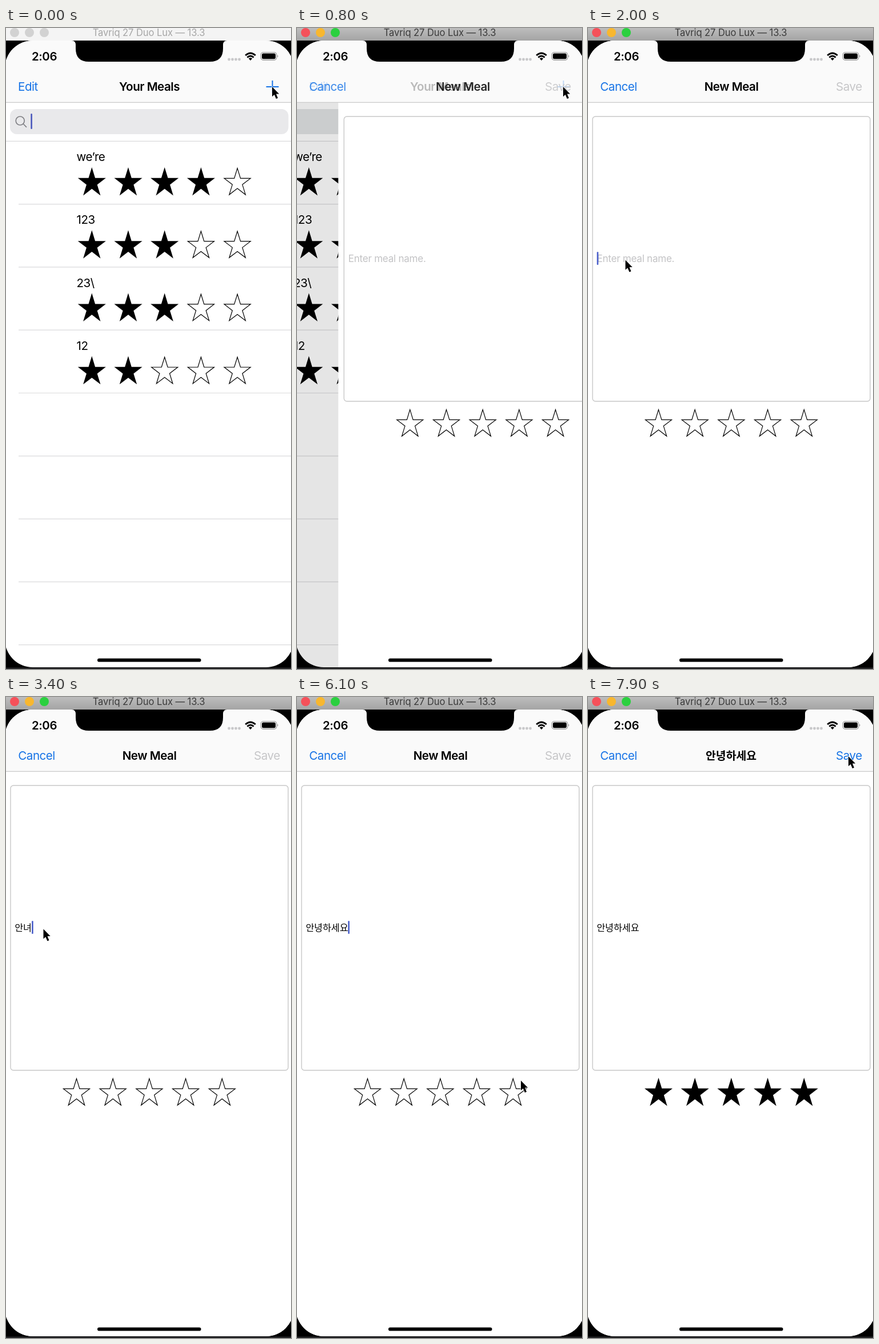
Animation, 499 px wide and 1123 px high, one loop 8000 ms. Source, as an HTML page:

```html
<!DOCTYPE html>
<html lang="ko">
<head>
<meta charset="utf-8">
<title>New Meal</title>
<style>
html, body { margin: 0; width: 100%; height: 100%; overflow: hidden; background: #000; }
svg { display: block; width: 100%; height: 100%; }
text { font-family: Inter, "Noto Sans CJK KR", "Noto Sans CJK JP", sans-serif; white-space: pre; }
.nav { font-size: 20.6px; letter-spacing: -.5px; }
.bold { font-weight: 600; text-anchor: middle; }
.blue { fill: #1673e6; }
.ko { font-family: "Noto Sans CJK KR", "Noto Sans CJK JP", "Noto Sans CJK", sans-serif; }
.small { font-size: 17.1px; letter-spacing: -.28px; }
.line { stroke: #dadadc; stroke-width: 1.2; }
</style>
</head>
<body>
<svg viewBox="0 0 499 1123" preserveAspectRatio="none">
  <defs>
    <clipPath id="screen"><rect x="-2" y="22" width="506" height="1098" rx="49"/></clipPath>
    <linearGradient id="metal" x2="0" y2="1">
      <stop stop-color="#bdbdbd"/><stop offset="1" stop-color="#a4a4a4"/>
    </linearGradient>
  </defs>
  <rect width="499" height="1123"/>
  <rect y="1120.5" width="499" height="2.5" fill="#242426"/>

  <rect id="bar" width="499" height="22"/>
  <g id="lights"><circle cx="15" cy="8" r="8"/><circle cx="41" cy="8" r="8"/><circle cx="67" cy="8" r="8"/></g>
  <text id="device" x="250" y="14" text-anchor="middle" font-size="16.6" letter-spacing="-.1">Tavriq 27 Duo Lux — 13.3</text>

  <g clip-path="url(#screen)">
    <rect y="22" width="499" height="1101" fill="#fff"/>
    <g id="list">
      <rect id="search" x="7" y="142" width="487.5" height="44" rx="12"/>
      <g fill="none" stroke="#808085" stroke-width="1.7" stroke-linecap="round">
        <circle cx="24.7" cy="162.5" r="7.5"/><path d="M30.2 168L35.5 173.3"/>
      </g>
      <rect x="43.3" y="150" width="2.6" height="27" rx="1" fill="#4a58bd"/>
      <path class="line" d="M-2 198.3H660"/>
      <g id="rows"></g>
    </g>
    <rect id="dim" x="-2" y="130" width="506" height="993"/>
    <g id="form">
      <rect x="-2" y="22" width="506" height="1101" fill="#fff"/>
      <rect x="8" y="155" width="486" height="499" rx="5" fill="#fff" stroke="#c8c8c8" stroke-width="1.4"/>
      <rect id="mark" x="12.5" y="392.5" width="93.5" height="24" fill="#cbd9ea"/>
      <text id="hint" class="small" x="15.5" y="410" fill="#c3c3c5">Enter meal name.</text>
      <text id="typed" class="ko" x="15.2" y="409.6" font-size="16.2"></text>
      <text id="extra" class="ko" x="90.5" y="409.6" font-size="16.2">ㅕ</text>
      <rect id="caret" y="392.3" width="2.6" height="22.7" rx="1" fill="#4a5fcb"/>
      <g id="rating"></g>
    </g>
    <rect y="22" width="499" height="108" fill="#fafafa"/>
    <path d="M0 130.3H499" stroke="#cacaca" stroke-width="1.2"/>
    <g id="oldNav" class="nav">
      <text class="blue" x="21" y="110.3">Edit</text>
      <text class="bold" x="251" y="110.3">Your Meals</text>
      <path id="plus" d="M455.5 103H477.5M466.5 92V114" stroke="#1673e6" stroke-width="2"/>
    </g>
    <g id="newNav" class="nav">
      <text class="blue" x="21.3" y="110.3">Cancel</text>
      <text id="title" class="bold" x="251" y="110.3">New Meal</text>
      <text id="named" class="bold ko" x="250.6" y="109.8" style="font-size:19.4px;letter-spacing:0">안녕하세요</text>
      <text id="save" x="434" y="110.3">Save</text>
    </g>
    <path d="M115 22Q122 22 122 30V36Q122 59 145 59H357Q380 59 380 36V30Q380 22 387 22Z"/>
    <text class="bold" x="67" y="57" font-size="20.4" letter-spacing="-.4">2:06</text>
    <g fill="#c8c8ca"><circle cx="390.5" cy="55" r="2.4"/><circle cx="396.5" cy="55" r="2.4"/><circle cx="402.5" cy="55" r="2.4"/><circle cx="408.5" cy="55" r="2.4"/></g>
    <path d="M419.2 48Q428 39.8 436.8 48M422.4 51.6Q428 46.4 433.6 51.6" fill="none" stroke="#000" stroke-width="2.9"/>
    <path d="M424.8 53.6Q428 50.8 431.2 53.6L428 57Z"/>
    <rect x="446.2" y="42.7" width="27.6" height="13.4" rx="4" fill="none" stroke="#8c8c8c" stroke-width="1.1"/>
    <rect x="448" y="44.5" width="24" height="9.8" rx="2.4"/>
    <path d="M475.3 47.2Q477.6 49.4 475.3 51.6Z" fill="#8c8c8c"/>
    <rect x="160" y="1104.4" width="181.5" height="6.2" rx="3.1"/>
  </g>
  <path id="pointer" d="M0 0V17.2L3.8 13.7L6.9 21L10 19.7L7 12.6H12.2Z" stroke="#fff" stroke-width="1.3" paint-order="stroke"/>
</svg>
<script>
const $ = id => document.getElementById(id);
const LOOP = 8000, STEP = 100, WIDTH = 506;

const lerp = (a, b, k) => a + (b - a) * k;
const clamp = v => Math.max(0, Math.min(1, v));
const show = (id, on) => $(id).setAttribute('opacity', +on);
const fill = (id, color) => $(id).setAttribute('fill', color);
const move = (id, x, y = 0) => $(id).setAttribute('transform', `translate(${x} ${y})`);

function star(cx, cy, full) {
  const R = full ? 25.8 : 24.2;
  let pts = '';
  for (let i = 0; i < 10; i++) {
    const r = i % 2 ? R * 0.382 : R, a = i * Math.PI / 5;
    pts += `${(cx + r * Math.sin(a)).toFixed(2)},${(cy - r * 1.06 * Math.cos(a)).toFixed(2)} `;
  }
  const paint = full ? 'fill="#000"' : 'fill="none" stroke="#000" stroke-width="1.2"';
  return `<polygon points="${pts}" ${paint}/>`;
}

function stars(x, y, count) {
  return [0, 1, 2, 3, 4].map(i => star(x + i * 63.7, y, i < count)).join('');
}

const meals = [['we’re', 4], ['123', 3], ['23\\', 3], ['12', 2]];
let rows = '';
for (let i = 0; i < 8; i++) {
  const y = 198.3 + i * 110.3;
  if (meals[i]) {
    const [name, rate] = meals[i];
    rows += `<text class="nav" x="123.5" y="${y + 34.8}">${name}</text>` + stars(150.3, y + 73, rate);
  }
  rows += `<path class="line" d="M22 ${y + 110.3}H660"/>`;
}
$('rows').innerHTML = rows;

const typing = [
  [2300, 'ㅇ'], [2500, '아'], [2900, '안'], [3100, '안ㄴ'], [3300, '안녀'], [3600, '안녕'],
  [3800, '안녕ㅎ'], [3900, '안녕하'], [4000, '안녕하ㅅ'], [4200, '안녕하세'],
  [4300, '안녕하세ㅇ'], [4400, '안녕하세요']
];

// time, x, y of the pointer tip
const path = [
  [0, 466, 103], [800, 466, 103], [900, 437, 114], [1200, 225, 255], [1500, 65.5, 406.5],
  [5400, 65.5, 406.5], [5800, 225, 550], [6100, 392, 672], [6300, 386, 684],
  [6600, 386, 684], [6900, 436, 390], [7300, 457, 120], [7500, 456, 104], [LOOP, 456, 104]
];

function pointerAt(t) {
  const i = path.findIndex((p, n) => n && t <= p[0]);
  const a = path[i - 1], b = path[i], k = (t - a[0]) / (b[0] - a[0]);
  return [lerp(a[1], b[1], k), lerp(a[2], b[2], k)];
}

// Critically damped push: 1 before it starts, settling to 0
function pushLeft(t) {
  const x = Math.max(0, t - 630) * 0.02;
  return (1 + x) * Math.exp(-x);
}

let rated = null;
function draw(t) {
  const active = t >= 200;
  fill('bar', active ? 'url(#metal)' : '#f4f4f4');
  fill('device', active ? '#3a3a3a' : '#a6a6a6');
  ['#f5515a', '#f8b72f', '#2bd03f'].forEach((c, i) =>
    $('lights').children[i].setAttribute('fill', active ? c : '#d2d2d2'));

  const q = t < 1500 ? pushLeft(t) : 0;
  move('list', -0.3 * WIDTH * (1 - q));
  show('list', q > 0);
  fill('search', q < 1 ? '#e2e4e5' : '#e9e9eb');
  show('dim', 0.12 * (1 - q));
  move('form', WIDTH * q);
  show('oldNav', clamp((q - 0.05) * 2.6));
  show('plus', t >= 400 && t < 700 ? 0.4 : 1);
  show('newNav', q < 1 ? clamp(1 - q * 1.05) : 0);
  move('title', Math.min(130, 700 * q ** 1.5));

  let text = '';
  for (const [at, s] of typing) if (t >= at) text = s;
  $('typed').textContent = text;
  show('hint', !text);
  const marked = t >= 4500 && t < 4900;
  show('mark', marked);
  show('extra', marked);
  $('caret').setAttribute('x', marked ? 103.3 : 15.6 + text.length * 14.75);

  const done = t >= 7500;
  show('caret', done ? 0 : clamp((t - 1600) / 200));
  show('title', !done);
  show('named', done);
  fill('save', done ? '#1673e6' : '#c6c6c8');

  const score = t >= 6500 ? 5 : 0;
  if (score !== rated) $('rating').innerHTML = stars(123.5, 694.3, rated = score);
  move('pointer', ...pointerAt(t));
}

const start = performance.now();
function tick() {
  const t = (performance.now() - start) % LOOP;
  draw(Math.floor(t / STEP) * STEP);
  requestAnimationFrame(tick);
}
tick();
</script>
</body>
</html>
```
